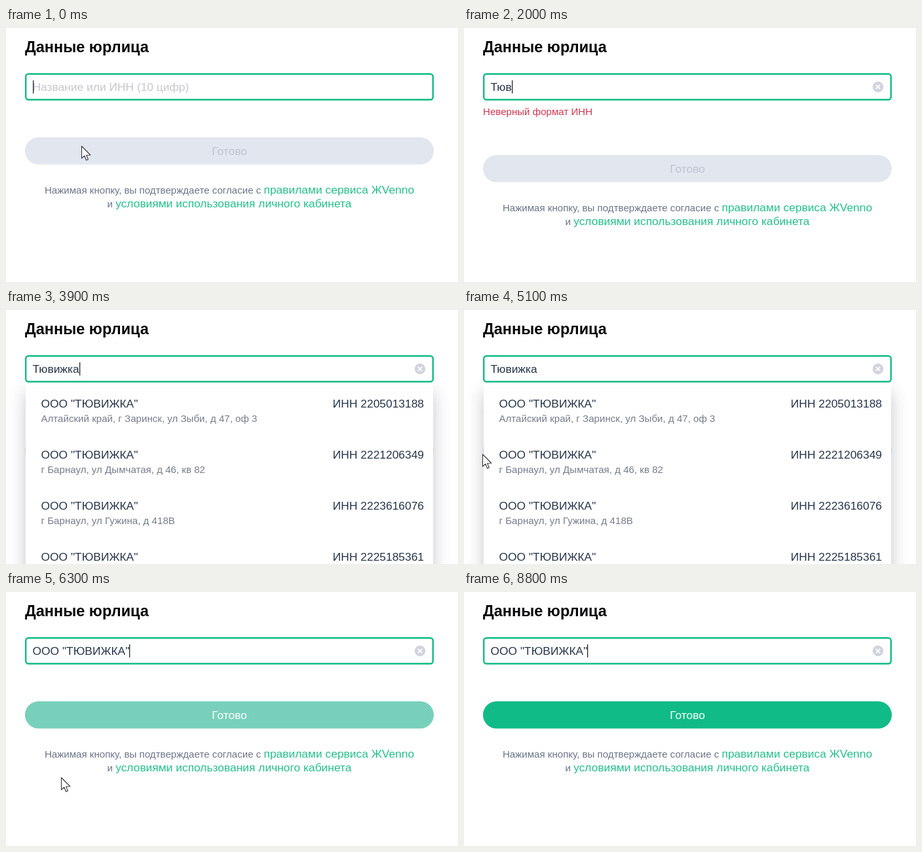
An HTML page with a canvas that plays this animation: 690x388 px, repeating every 8900 ms.

```html
<!DOCTYPE html>
<html lang="ru">
<head>
<meta charset="utf-8">
<title>Данные юрлица</title>
<style>
html, body { margin: 0; width: 100%; height: 100%; overflow: hidden; background: #fff; }
canvas { display: block; width: 690px; height: 388px; }
</style>
</head>
<body>
<canvas id="stage"></canvas>
<script>
const W = 690, H = 388, LOOP = 8900, STEP = 100;
const canvas = document.getElementById('stage');
const ctx = canvas.getContext('2d');
const ratio = window.devicePixelRatio || 1;
canvas.width = W * ratio;
canvas.height = H * ratio;

const FAMILY = '"Liberation Sans", Arial, sans-serif';
const TITLE = `bold 23.5px ${FAMILY}`;
const BODY = `17.4px ${FAMILY}`;
const SMALL = `15.1px ${FAMILY}`;
const GREEN = '#10bb87', LINK = '#25bf8b', INK = '#263449', MUTED = '#757c8b';

const LEFT = 29, RIGHT = 653, MID = 341;
const ROW_TOP = 112, ROW_H = 78;
const ERROR_SHIFT = 27;

const WORD = 'Тювижка';
const COMPANY = 'ООО "ТЮВИЖКА"';
const KEY_TIMES = [1200, 1500, 1900, 2200, 2600, 3100, 3600];
const OPEN = 2400, REFILTER = 3200, PICK = 6300;

const firms = [
  ['ООО "ТЮВИЖА"', '0309991565', 'Респ Бурятия, Таданский р-н, пгт Веремгинск, Кедровный мкр, д 48, кв 31'],
  [COMPANY, '2205013188', 'Алтайский край, г Заринск, ул Зыби, д 47, оф 3'],
  [COMPANY, '2221206349', 'г Барнаул, ул Дымчатая, д 46, кв 82'],
  [COMPANY, '2223616076', 'г Барнаул, ул Гужина, д 418В'],
  [COMPANY, '2225185361', 'г Барнаул']
];

// Pointer stops: time, x, y
const enterPath = [[0, 115, 180], [100, 66, 204], [200, 28, 220]];
const pickPath = [[5100, 28, 220], [5300, 48, 246], [5600, 83, 280], [6300, 84, 283],
  [7300, 84, 283], [7700, 87, 285], [8400, 87, 285], [8700, 150, 390]];

const clamp = v => Math.max(0, Math.min(1, v));

function along(path, t) {
  const last = path[path.length - 1];
  if (t >= last[0]) return { x: last[1], y: last[2] };
  const i = Math.max(1, path.findIndex(p => p[0] > t));
  const [t0, x0, y0] = path[i - 1], [t1, x1, y1] = path[i];
  const k = clamp((t - t0) / (t1 - t0));
  return { x: x0 + (x1 - x0) * k, y: y0 + (y1 - y0) * k };
}

function pointerAt(t) {
  if (t < KEY_TIMES[0]) return along(enterPath, t);
  if (t >= 5000 && t < 8700) return along(pickPath, t);
  return null;
}

function caretOn(t) {
  if (t < KEY_TIMES[0]) return t < 400 || t >= 900;
  let since = KEY_TIMES.filter(k => k <= t).pop();
  if (t >= PICK) since = PICK + 100;
  return Math.max(0, t - since) % 1000 < 500;
}

function text(str, x, y, font, color, align = 'left') {
  ctx.font = font;
  ctx.fillStyle = color;
  ctx.textAlign = align;
  ctx.fillText(str, x, y);
}

function widthOf(str, font) {
  ctx.font = font;
  return ctx.measureText(str).width;
}

function box(x, y, w, h, r) {
  ctx.beginPath();
  ctx.roundRect(x, y, w, h, r);
}

function shape(points) {
  ctx.beginPath();
  points.forEach(([x, y]) => ctx.lineTo(x, y));
  ctx.closePath();
}

function termsLine(plain, link, y) {
  const w = widthOf(plain, SMALL);
  const x = MID - (w + widthOf(link, BODY)) / 2;
  text(plain, x, y, SMALL, '#6b7487');
  text(link, x + w, y, BODY, LINK);
}

function drawForm(t) {
  const invalid = t >= KEY_TIMES[0] && t < PICK;
  const dy = invalid ? ERROR_SHIFT : 0;
  const ready = t >= PICK ? clamp((t - PICK + 100) / 200) : 0;

  if (invalid) text('Неверный формат ИНН', LEFT, 132.5, SMALL, '#d2354f');

  box(LEFT, 167 + dy, RIGHT - LEFT, 41.5, 20.75);
  ctx.fillStyle = '#e2e6ef';
  ctx.fill();
  ctx.globalAlpha = ready;
  ctx.fillStyle = GREEN;
  ctx.fill();
  ctx.globalAlpha = 1;
  text('Готово', MID, 193.5 + dy, BODY, ready ? '#fff' : '#bcc3d1', 'center');

  termsLine('Нажимая кнопку, вы подтверждаете согласие с ', 'правилами сервиса ЖVenno', 252.5 + dy);
  termsLine('и ', 'условиями использования личного кабинета', 274 + dy);
}

function drawList(t, pointer) {
  ctx.save();
  ctx.shadowColor = 'rgba(30, 40, 60, 0.26)';
  ctx.shadowBlur = 24 * ratio;
  ctx.shadowOffsetY = 14 * ratio;
  ctx.fillStyle = '#fff';
  ctx.fillRect(30, ROW_TOP - 1, 622, 400);
  ctx.restore();

  const inside = pointer && pointer.x > 30;
  const hover = inside ? Math.floor((pointer.y - ROW_TOP) / ROW_H) : -1;
  const first = t < REFILTER ? 0 : 1;
  firms.slice(first, first + 4).forEach(([name, inn, address], i) => {
    const y = ROW_TOP + i * ROW_H;
    if (i === hover) {
      ctx.fillStyle = '#faedb0';
      ctx.fillRect(30, y, 622, ROW_H);
    }
    text(name, 53.5, y + 37, BODY, INK);
    text('ИНН ' + inn, 638, y + 37, BODY, INK, 'right');
    text(address, 53.5, y + 59, SMALL, MUTED);
  });
}

function drawInput(t) {
  box(LEFT + 1.2, 70.2, RIGHT - LEFT - 2.4, 39.3, 4);
  ctx.fillStyle = '#fff';
  ctx.fill();
  ctx.strokeStyle = GREEN;
  ctx.lineWidth = 2.4;
  ctx.stroke();

  const typed = KEY_TIMES.filter(k => k <= t).length;
  const value = t >= PICK ? COMPANY : WORD.slice(0, typed);
  if (value) {
    text(value, 40.5, 96, BODY, INK);
    drawClear(632, 90);
  } else {
    text('Название или ИНН (10 цифр)', 40.5, 96, BODY, '#c5c7cc');
  }
  if (caretOn(t)) {
    ctx.fillStyle = '#20262f';
    ctx.fillRect(Math.round(40.5 + widthOf(value, BODY)), 80, 1.3, 20);
  }
}

function drawClear(x, y) {
  ctx.beginPath();
  ctx.arc(x, y, 8.2, 0, Math.PI * 2);
  ctx.fillStyle = '#d0d4df';
  ctx.fill();
  ctx.beginPath();
  for (const s of [-1, 1]) {
    ctx.moveTo(x - 3.2, y - 3.2 * s);
    ctx.lineTo(x + 3.2, y + 3.2 * s);
  }
  ctx.strokeStyle = '#fff';
  ctx.lineWidth = 1.8;
  ctx.stroke();
}

function drawPointer({ x, y }, hand) {
  ctx.save();
  ctx.translate(x, y);
  ctx.lineJoin = 'round';
  ctx.lineWidth = 1.1;
  ctx.strokeStyle = '#33363c';
  ctx.fillStyle = '#fff';
  if (hand) {
    shape([[-2, 1], [-0.5, -0.5], [1.2, 0], [2, 2], [2, 9], [4, 8], [6, 9.5], [8, 9.2],
      [9, 10.8], [11, 10.8], [12, 13], [12, 18], [9.5, 22], [9.5, 25.5], [-1, 25.5],
      [-1, 23], [-6, 16], [-7, 13.5], [-5.5, 12.2], [-2, 15]]);
  } else {
    shape([[0.5, 0.5], [0.5, 19], [4.8, 15.2], [7.6, 22], [10.4, 20.8], [7.6, 14.3], [13.8, 14]]);
  }
  ctx.fill();
  ctx.stroke();
  if (hand) {
    ctx.beginPath();
    for (const fx of [2, 5.6, 9]) {
      ctx.moveTo(fx, 9.5);
      ctx.lineTo(fx, 14);
    }
    ctx.stroke();
  }
  ctx.restore();
}

function draw(t) {
  const pointer = pointerAt(t);
  const open = t >= OPEN && t < PICK;
  ctx.setTransform(ratio, 0, 0, ratio, 0, 0);
  ctx.fillStyle = '#fff';
  ctx.fillRect(0, 0, W, H);
  text('Данные юрлица', LEFT, 37.3, TITLE, '#050607');
  drawForm(t);
  if (open) drawList(t, pointer);
  drawInput(t);
  if (pointer) drawPointer(pointer, open && pointer.x > 30);
}

const start = performance.now();
function tick() {
  const t = (performance.now() - start) % LOOP;
  draw(Math.floor(t / STEP) * STEP);
  requestAnimationFrame(tick);
}
tick();
</script>
</body>
</html>
```
